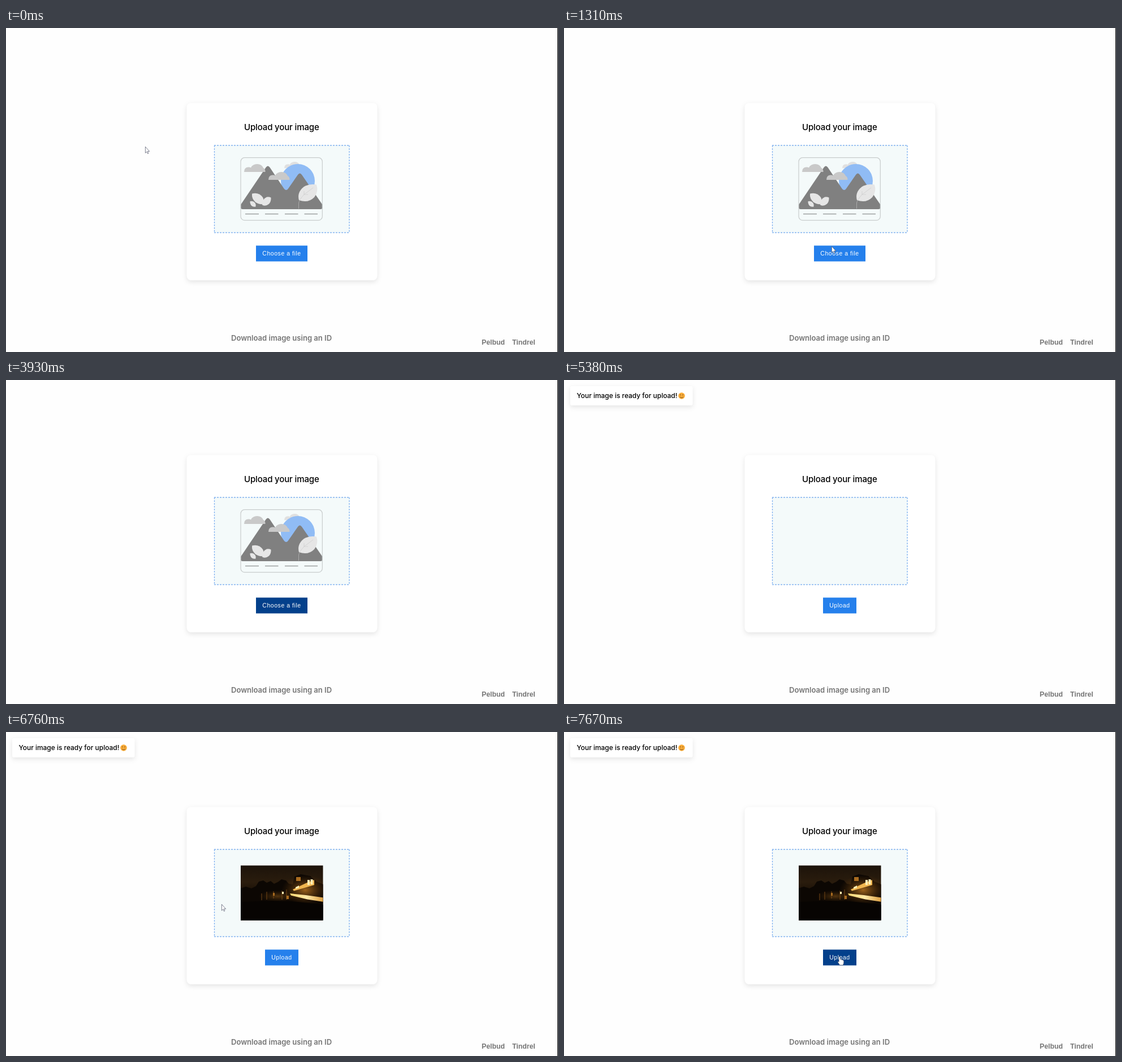
These frames come from a looping animation (976x574 px, 8000 ms). An HTML page:

```html
<!DOCTYPE html>
<html lang="en">
<head>
<meta charset="utf-8">
<title>Upload your image</title>
<style>
html, body { margin: 0; width: 100%; height: 100%; overflow: hidden; background: #fefefe; }
svg { display: block; width: 100%; height: 100%; }
text { font-family: Inter, sans-serif; font-weight: 500; }
.card { fill: #fff; filter: drop-shadow(0 3px 4px rgba(0, 0, 0, .1)); }
.label { font: 10.5px "Liberation Sans", Arial, sans-serif; letter-spacing: .55px; fill: #fff; }
.link { font: bold 12.3px "Liberation Sans", Arial, sans-serif; fill: #757575; }
.cursor { fill: #fff; stroke: #4a4e63; stroke-width: .7; stroke-linejoin: round; }
</style>
</head>
<body>
<svg viewBox="0 0 976 574">
  <defs>
    <linearGradient id="night" x2="0" y2="1">
      <stop stop-color="#1c130a"/><stop offset=".3" stop-color="#2a1c0d"/>
      <stop offset=".55" stop-color="#160d05"/><stop offset="1" stop-color="#050302"/>
    </linearGradient>
    <linearGradient id="beam">
      <stop stop-color="#ffd873"/><stop offset=".5" stop-color="#ffe9a6"/><stop offset="1" stop-color="#d99a3c"/>
    </linearGradient>
    <radialGradient id="glow">
      <stop stop-color="#c07a22" stop-opacity=".8"/><stop offset="1" stop-color="#5a3208" stop-opacity="0"/>
    </radialGradient>
    <filter id="soft" x="-20%" y="-50%" width="140%" height="200%"><feGaussianBlur stdDeviation=".6"/></filter>
    <clipPath id="crop"><path d="M415 236.500h145.500v97h-145.500z"/></clipPath>
    <path id="cloud" d="M0 14Q0 6 7 5.500Q10 5 12 6.500Q15 0 23 0Q31 0 34 7Q37.500 8.500 37.500 14z"/>
  </defs>

  <rect class="card" x="319.500" y="133" width="337" height="314" rx="8"/>
  <text x="421" y="180.600" font-size="15" letter-spacing="-.15">Upload your image</text>
  <path fill="#f4fafa" d="M368 207.500h239.500v155.500h-239.500z"/>
  <path fill="none" stroke="#82b2f0" stroke-width="1.300" stroke-dasharray="3 2" d="M368 208h239.500M368 362.500h239.500M368.500 208v155M607 208v155"/>

  <g id="art">
    <use href="#cloud" transform="translate(492 237) scale(.8)" fill="#e0e0e0"/>
    <circle cx="516" cy="271" r="30" fill="#90bcf5"/>
    <path fill="#808080" d="M415 313L459.500 247Q463 242 466.500 247L491.500 284.500Q495.500 289.500 499 284.500L516 260Q519.500 255 523 260L559.500 313V318Q559.500 321 556 321H418.500Q415 321 415 318z"/>
    <use href="#cloud" x="421" y="241" fill="#c9c9c9"/>
    <use href="#cloud" x="464" y="255" fill="#c9c9c9"/>
    <g fill="#e6e6e6">
      <path d="M518 305Q514 291 527 281Q537 275.500 549 277.500Q553 290 545 300Q534 311 518 305z"/>
      <path d="M435 293.500Q447 290.500 454 300Q457 306 455 312Q447 313 441 308.500Q434 302 435 293.500z"/>
      <path d="M453 313.500Q453 303 461 299.500Q465 298.500 468.500 300.500Q469 308 464.500 312Q459 316.500 453 313.500z"/>
      <path d="M431.500 307Q437 305.500 440.500 310Q442.500 313 441.500 316.500Q436 317.500 433 313.500Q431 310.500 431.500 307z"/>
    </g>
    <path d="M517.500 320V310Q518 305 527 295L543 283M527 295V289M527 295H534" fill="none" stroke="#c6c6c6" stroke-width=".6"/>
    <rect x="415" y="229.700" width="144.300" height="111" rx="7" fill="none" stroke="#c8cccc" stroke-width="1.200"/>
    <path d="M423 329.500h24m11 0h23.500m11.500 0h23.500m11 0h23.500" stroke="#9c9f9f" stroke-width="1.400"/>
  </g>

  <g id="photo" clip-path="url(#crop)">
    <path fill="url(#night)" d="M414 236h147v98h-147z"/>
    <path fill="#0c0703" d="M414 277L424 274L434 277L442 273L447 265L455 263L461 267L468 264L474 269L482 265L487 261L495 263L500 269L507 270L510 256L521 252L538 255L549 265L561 270V334H414z"/>
    <ellipse cx="529" cy="280" rx="42" ry="27" fill="url(#glow)"/>
    <ellipse cx="480" cy="291" rx="34" ry="11" fill="url(#glow)" opacity=".5"/>
    <path d="M452 286v12m9-15v14m12-15v13m15-14v16m8-18v18" stroke="#80501a" stroke-width=".9"/>
    <g filter="url(#soft)">
      <path fill="#f0b650" d="M507 279L530 268L545 262V271L528 276L509 281.500z"/>
      <path fill="url(#beam)" d="M502 286L530 289L562 293.500V301L533 296.500L504 289.500z"/>
      <path fill="#fff0b5" d="M512 275l6-3v4l-6 2zM533 262h4v9h-4zM538.500 261h4v9h-4zM488 283h3v4h-3z"/>
      <path fill="#a96c20" d="M513 257h8v7h-8zM472 285h3v5h-3zM496 290h4v6h-4z"/>
    </g>
    <path fill="#070402" d="M414 301L470 299L505 300L535 303L561 306V334H414z"/>
  </g>

  <rect id="button" y="385.500" height="28"/>
  <text id="label" class="label" y="403"/>

  <g id="toast">
    <rect class="card" x="11" y="11" width="216.500" height="34" rx="3"/>
    <text x="22.500" y="32" font-size="11.950">Your image is ready for upload!</text>
    <circle cx="208" cy="28" r="5.800" fill="#f9ac38"/>
    <path d="M205 29.800Q208 33.200 211 29.800" fill="none" stroke="#6b4520" stroke-width=".9"/>
    <path d="M206 25.500v1.800m4-1.800v1.800" stroke="#6b4520" stroke-width="1.100"/>
  </g>

  <text x="398" y="553.500" font-size="13.050" fill="#757575" style="font-weight:600">Download image using an ID</text>
  <text class="link" x="841" y="560.500">Pelbud</text>
  <text class="link" x="895" y="560.500">Tindrel</text>
  <path d="M975 0h1v574h-1z"/>

  <path id="arrow" class="cursor" d="M.4.400V11.400L2.800 9.200L4.500 12.700L6 12L4.400 8.500H7.700z"/>
  <path id="hand" class="cursor" d="M-1.400 9V1.400a1.400 1.400 0 0 1 2.800 0V5.200q1.200-.6 2.200.400q1.200-.5 1.900.6q1.700-.2 1.700 1.600V10.500q0 2-1 3.200V15H0q-.8-1.800-2.900-4.400q-1-1.400.2-1.900q.7-.2 1.300.6z"/>
</svg>
<script>
const LOOP = 8000;
const $ = id => document.getElementById(id);
const clamp = v => Math.min(1, Math.max(0, v));

// Pointer updates: first time, last time, number of updates
const bursts = [[190, 400, 4], [830, 1530, 10], [6670, 7460, 11], [7530, 7670, 3]];
// Pointer hotspot: time, x, y
const path = [
  [120, 246, 210], [260, 338, 284], [400, 396, 331],
  [752, 396, 331], [1297, 473, 386.5], [1530, 485, 402],
  [6669, 364, 277], [6910, 415, 361], [7144, 440.5, 402],
  [7460, 475, 409], [7530, 484, 405], [7670, 487.5, 398]
];

function lastUpdate(t) {
  let held = 0;
  for (const [a, b, n] of bursts) {
    if (t < a) break;
    const step = (b - a) / (n - 1);
    held = a + step * Math.min(n - 1, Math.floor((t - a) / step + 1e-6));
  }
  return held;
}

function pointerAt(t) {
  const i = path.findIndex(p => p[0] >= t);
  if (i < 1) return path.at(i);
  const a = path[i - 1], b = path[i];
  const k = (t - a[0]) / (b[0] - a[0]);
  return a.map((v, j) => v + (b[j] - v) * k);
}

const show = (id, on) => $(id).setAttribute("display", on ? "inline" : "none");

function draw(t) {
  const held = lastUpdate(t);
  const ready = t >= 5380;
  const visible = t < 3930 || t >= 6670;
  const pressing = ready ? t >= 7530 : t >= 1370;
  show("art", !ready);
  show("toast", ready);
  show("photo", t >= 5830);
  show("arrow", visible && !pressing);
  show("hand", visible && pressing);

  const [, x, y] = pointerAt(held);
  for (const id of ["arrow", "hand"]) $(id).setAttribute("transform", `translate(${x} ${y})`);

  const hover = clamp((held - (ready ? 7470 : 1330)) / 200);
  const mix = (a, b) => Math.round(a + (b - a) * hover);
  $("button").setAttribute("fill", `rgb(${mix(37, 3)},${mix(128, 64)},${mix(236, 139)})`);
  $("button").setAttribute("x", ready ? 458 : 442);
  $("button").setAttribute("width", ready ? 59 : 91);
  $("label").setAttribute("x", ready ? 469.2 : 453.3);
  $("label").textContent = ready ? "Upload" : "Choose a file";
}

const start = performance.now();
function tick() {
  draw((performance.now() - start) % LOOP);
  requestAnimationFrame(tick);
}
tick();
</script>
</body>
</html>
```
